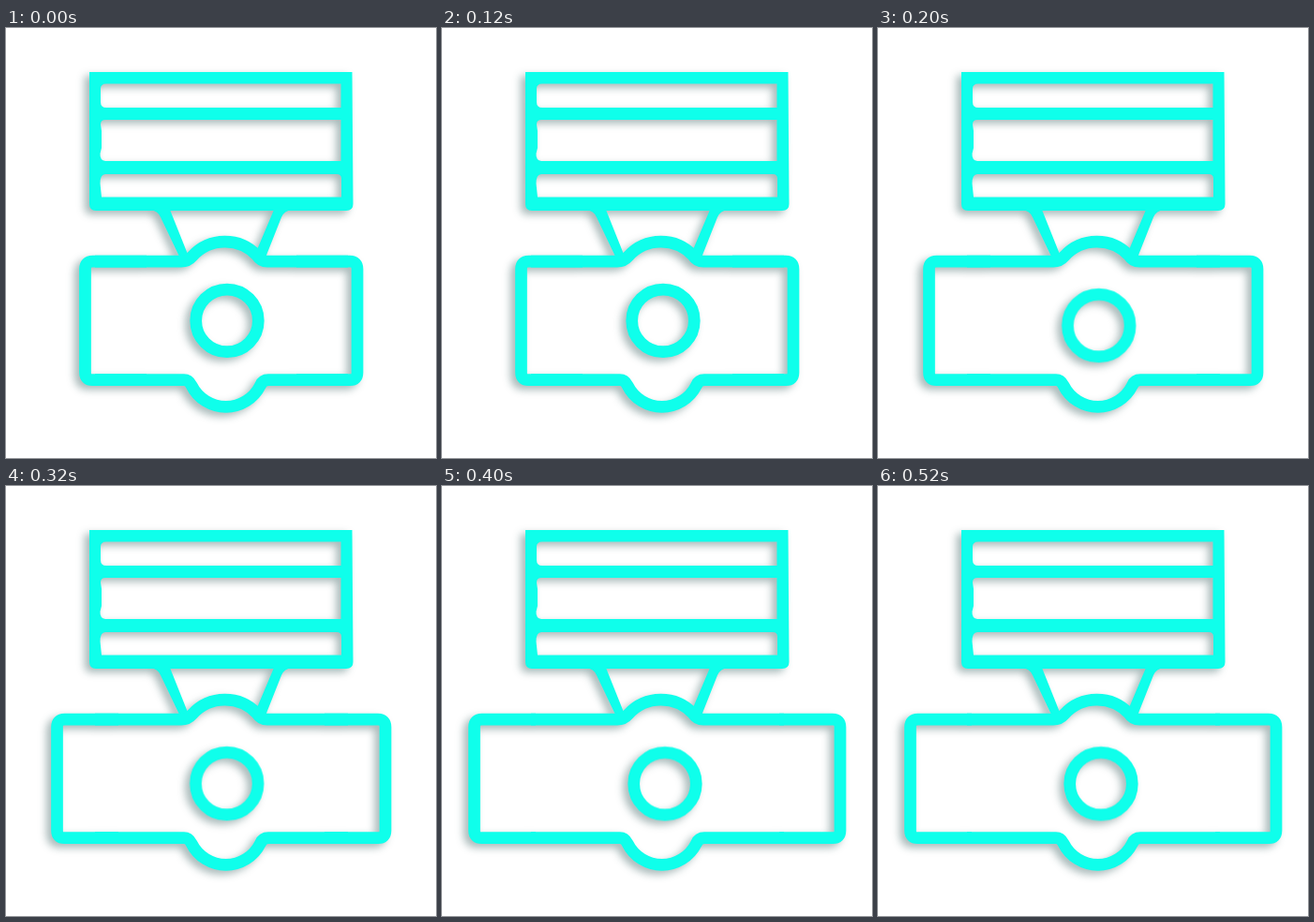
An HTML page for the animation above (600 ms loop, 459 px wide and 459 px high).

```html
<!DOCTYPE html>
<html lang="en">
<head>
<meta charset="utf-8">
<title>Medal icon</title>
<style>
  html, body { margin: 0; width: 100%; height: 100%; overflow: hidden; background: #fff; }
  svg { display: block; width: 100vw; height: 100vh; }
  .icon { filter: drop-shadow(-4.5px 4.5px 4px rgba(0, 50, 50, .34)); }
  .line { fill: none; stroke: #0fffeb; stroke-width: 12.7; }
  .solid { fill: #0fffeb; fill-rule: evenodd; }
  .left, .right, .ring { animation: 600ms step-end infinite; }
  .left { animation-name: left; }
  .right { animation-name: right; }
  .ring { animation-name: ring; }

  @keyframes left {
    0% { transform: translateX(0); }
    33.333% { transform: translateX(-30px); }
    66.667%, 100% { transform: translateX(-50px); }
  }
  @keyframes right {
    0% { transform: translateX(0); }
    33.333% { transform: translateX(30px); }
    66.667%, 100% { transform: translateX(50px); }
  }
  @keyframes ring {
    0% { transform: translate(0, 0); }
    33.333% { transform: translate(-.3px, 5.2px); }
    66.667%, 100% { transform: translate(2px, 5.4px); }
  }
</style>
</head>
<body>
<svg viewBox="0 0 459 459">
  <g class="icon">
    <!-- ribbon bar with three slots -->
    <path class="solid" d="M89 47H369.5L370.5 188Q370.5 195 363 195H96Q89 195 89 188Z
      M107 59.5H357.5V85H107Q101 85 101 79V65Q101 59.5 107 59.5Z
      M106 98H357.5V142H106Q100 141 100.5 134L102 128V110L101 103Q101 98 106 98Z
      M106 156H353Q358 156 358 161V180.5H102L100.5 166Q100.5 156 106 156Z"/>
    <!-- straps -->
    <path class="solid" d="M154 194Q162 195 165 202L186 246L195 244L175 194Z
      M305 194Q297 195 294 202L277 245L267 239L286 194Z"/>
    <!-- fixed middle of the plate -->
    <path class="line" d="M95 249.2H187Q194 249.2 199 243.5A47 47 0 0 1 268 243Q272 249.2 279 249.2H365"/>
    <path class="line" d="M95 375.7H190Q195 375.7 198 381.5A41 41 0 0 0 271.500 381.5Q274 375.7 280 375.7H365"/>
    <!-- sliding ends -->
    <path class="line left" d="M150 249.2H92.500Q84.500 249.2 84.500 257.2V367.700Q84.500 375.700 92.500 375.700H150"/>
    <path class="line right" d="M310 249.2H367Q375 249.2 375 257.2V367.700Q375 375.700 367 375.700H310"/>
    <circle class="line ring" cx="236" cy="312.4" r="33.300"/>
  </g>
</svg>
</body>
</html>
```
